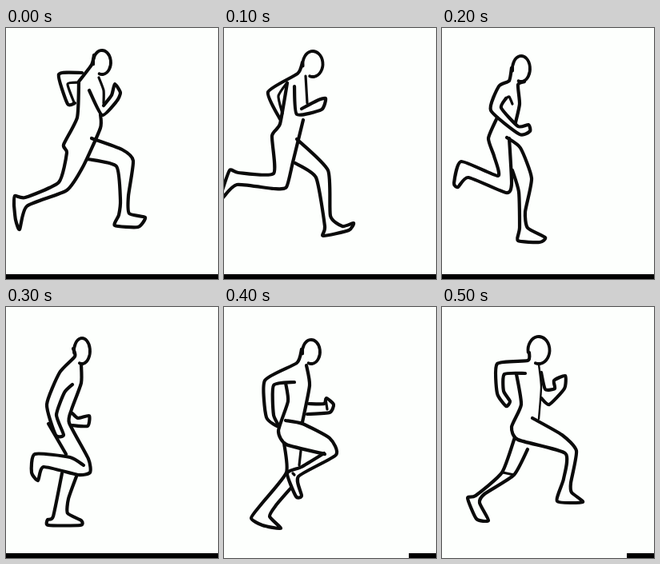
These frames come from a looping animation (265 by 314 pixels, 0.6 s). An HTML page with a canvas:

```html
<!DOCTYPE html>
<html lang="en">
<head>
<meta charset="utf-8">
<title>Running figure</title>
<style>
html, body { margin: 0; width: 100%; height: 100%; overflow: hidden; background: #fdfffd; }
canvas { display: block; width: 265px; height: 314px; }
</style>
</head>
<body>
<canvas></canvas>
<script>
const W = 265, H = 314, STEP = 100, PEN = 4.2, THIN = 3.2;
const canvas = document.querySelector('canvas');
const ctx = canvas.getContext('2d');
const ratio = window.devicePixelRatio || 1;
canvas.width = W * ratio;
canvas.height = H * ratio;
ctx.scale(ratio, ratio);
ctx.lineCap = ctx.lineJoin = 'round';
ctx.strokeStyle = '#0b0b0b';

// Oval left open where it meets the neck.
function head(x, y, rx, ry) {
  ctx.lineWidth = 3.8;
  ctx.beginPath();
  ctx.ellipse(x, y, rx, ry, 0, Math.PI * 0.95, Math.PI * 2.6);
  ctx.stroke();
}

// Pen stroke through x, y pairs with gentle Catmull-Rom tangents.
function line(width, ...xy) {
  const last = xy.length / 2 - 1;
  const at = i => {
    const k = 2 * Math.max(0, Math.min(last, i));
    return [xy[k], xy[k + 1]];
  };
  ctx.lineWidth = width;
  ctx.beginPath();
  ctx.moveTo(...at(0));
  for (let i = 0; i < last; i++) {
    const [a, b, c, d] = [at(i - 1), at(i), at(i + 1), at(i + 2)];
    ctx.bezierCurveTo(
      b[0] + (c[0] - a[0]) / 10, b[1] + (c[1] - a[1]) / 10,
      c[0] - (d[0] - b[0]) / 10, c[1] - (d[1] - b[1]) / 10, ...c);
  }
  ctx.stroke();
}

function stride() {
  head(120, 43, 11, 15);
  line(PEN, 110, 34, 107, 46, 91, 67);
  line(PEN, 95, 56, 66, 58, 77, 95, 86, 94);
  line(THIN, 91, 68, 77, 70, 85, 93);
  line(PEN, 91, 68, 89, 112, 72, 146, 76, 156, 66, 193, 24, 212, 11, 210, 10, 222);
  line(PEN, 10, 222, 12, 240, 17, 252, 26, 223, 76, 203, 97, 172, 118, 125, 118, 108);
  line(PEN, 107, 138, 145, 152, 159, 166, 153, 210, 154, 232, 174, 237, 165, 249, 136, 247, 141, 234, 143, 215, 138, 173, 102, 164);
  line(THIN, 116, 62, 122, 78, 122, 94);
  line(PEN, 104, 78, 120, 109, 138, 92, 143, 81, 136, 70, 132, 84, 122, 97);
}

function reach() {
  head(111, 45, 12.5, 16);
  line(PEN, 98, 43, 92, 57, 55, 80, 70, 114);
  line(THIN, 79, 68, 68, 85, 73, 107);
  line(PEN, 79, 69, 70, 120, 60, 135, 62, 182, 18, 181, 7, 178, -3, 206);
  line(PEN, -2, 213, 16, 196, 62, 201, 78, 199, 86, 168, 99, 115);
  line(PEN, 91, 139, 130, 178, 133, 235, 148, 248, 162, 244, 156, 253, 124, 260, 126, 248, 115, 187, 89, 169);
  line(PEN, 88, 73, 91, 108, 122, 102, 127, 88, 116, 91, 97, 101);
  line(THIN, 102, 60, 104, 94);
}

function land() {
  head(99, 51, 11, 16);
  line(PEN, 87, 50, 84, 66, 71, 73, 61, 103, 97, 133, 110, 129, 108, 121, 95, 123, 74, 100, 80, 88);
  line(PEN, 103, 67, 95, 71, 97, 95, 92, 118);
  line(THIN, 80, 88, 84, 86, 88, 95);
  line(PEN, 69, 112, 58, 138, 65, 160, 70, 185, 24, 167, 15, 194, 20, 199, 33, 187, 80, 206, 87, 195, 84, 138);
  line(PEN, 81, 137, 98, 150, 112, 188, 104, 230, 107, 250, 129, 262, 122, 268, 95, 266, 97, 250, 96, 205, 88, 178);
}

function stand() {
  head(95, 55, 10, 16);
  line(PEN, 84, 52, 86, 62, 67, 82, 51, 122, 62, 160, 72, 160, 63, 135, 73, 107, 83, 97);
  line(PEN, 94, 72, 94, 95, 82, 128, 79, 145, 103, 190, 105, 207, 90, 210, 47, 200, 40, 217, 32, 207, 36, 184, 80, 188, 97, 198);
  line(PEN, 83, 133, 90, 139, 104, 136, 102, 149, 83, 148);
  line(PEN, 53, 146, 75, 184);
  line(PEN, 70, 208, 59, 262, 52, 266, 53, 273, 93, 273, 94, 267, 77, 258, 78, 240, 88, 212);
}

function push() {
  head(109, 56, 11, 15);
  line(PEN, 97, 53, 91, 70, 51, 92, 53, 138, 69, 150, 62, 135, 62, 98, 88, 94);
  line(PEN, 77, 95, 80, 118, 68, 155, 78, 172, 126, 184);
  line(PEN, 103, 73, 107, 98, 98, 144);
  line(PEN, 106, 121, 125, 121, 128, 114, 137, 122, 132, 132, 104, 134);
  line(THIN, 127, 115, 129, 128);
  line(PEN, 77, 142, 98, 146, 132, 164, 140, 185, 93, 212, 97, 236, 90, 237, 79, 208, 97, 200, 125, 183);
  line(PEN, 75, 170, 78, 207, 48, 245, 34, 264, 48, 273, 71, 277, 57, 262, 65, 248, 84, 226);
  line(THIN, 96, 180, 94, 198);
  line(THIN, 86, 208, 88, 210);
}

function drive() {
  head(121, 54, 13.5, 17);
  line(PEN, 109, 57, 107, 67, 69, 71, 69, 108, 80, 124, 85, 118, 77, 105, 78, 84, 104, 83);
  line(PEN, 93, 84, 99, 122, 87, 150, 95, 166, 154, 183, 152, 215, 144, 243, 176, 244, 162, 232, 161, 220, 168, 180, 150, 160, 113, 139);
  line(2.4, 121, 72, 124, 100, 121, 140);
  line(PEN, 124, 82, 129, 103, 141, 102, 140, 92, 154, 86, 153, 102, 134, 122, 124, 114);
  line(PEN, 91, 163, 75, 207, 42, 236, 32, 239, 43, 265, 58, 267, 47, 245, 53, 234, 90, 210, 107, 178);
  line(THIN, 76, 207, 90, 210);
}

const poses = [stride, reach, land, stand, push, drive];

function draw() {
  const n = Math.floor(performance.now() / STEP) % poses.length;
  ctx.fillStyle = '#fdfffd';
  ctx.fillRect(0, 0, W, H);
  poses[n]();
  const left = n < 4 ? 0 : 231;
  ctx.fillStyle = '#000';
  ctx.fillRect(left, 308, W - left, 6);
  requestAnimationFrame(draw);
}
draw();
</script>
</body>
</html>
```
